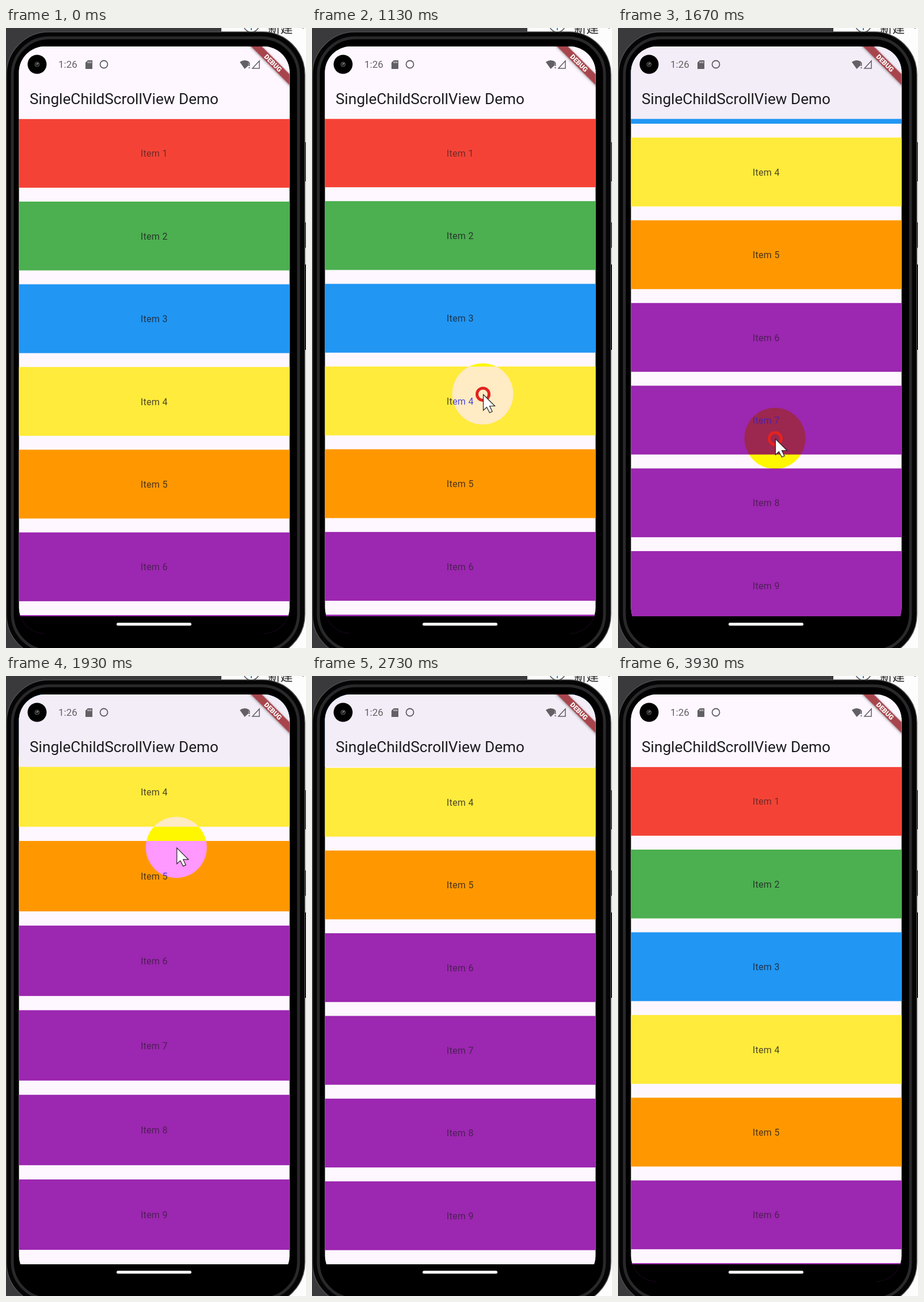
An HTML page that plays this animation: 521x1075 px, repeating every 3.99 s.

```html
<!DOCTYPE html>
<html lang="en">
<head>
<meta charset="utf-8">
<title>Scroll demo</title>
<style>
  html, body { margin: 0; height: 100%; overflow: hidden; background: #fff; }
  svg { display: block; width: 521px; height: 1075px; font-family: Roboto, sans-serif; }
  .item { font-size: 16px; letter-spacing: .3px; text-anchor: middle; fill: #1d1b20; }
  .halo { fill: #00f; mix-blend-mode: difference; }
  .ribbon { fill: #a8454c; filter: drop-shadow(0 1px 2px #0006); }
</style>
</head>
<body>
<svg viewBox="0 0 521 1075">
  <defs>
    <clipPath id="screen"><rect x="22.5" y="32" width="470" height="1018" rx="45"/></clipPath>
  </defs>

  <!-- desktop behind the phone -->
  <rect width="521" height="1075" fill="#fdfdfd"/>
  <path d="M0 0H374V20H260V1075H0Z" fill="#3a3a3c"/>
  <circle cx="426" cy="-7" r="14" fill="none" stroke="#555" stroke-width="1.5"/>
  <path d="M426 0V4" stroke="#2a8fd8" stroke-width="2"/>
  <text x="455" y="8" font-size="21.5" fill="#222" style="font-family:'Noto Sans CJK SC','Noto Sans CJK',sans-serif">新建</text>
  <path d="M513 -2l3 3 3-3" fill="none" stroke="#777"/>
  <path d="M519 198h2v68h-2zM519 337h2v44h-2z" fill="#444"/>
  <path d="M519 410h2v148h-2z"/>

  <!-- phone body -->
  <rect x=".7" y="6.700" width="518.300" height="1084" rx="74" fill="#050505" stroke="#4c4c4e" stroke-width="1.500"/>
  <rect x="11" y="17" width="497" height="1063" rx="64" stroke="#29292b" stroke-width="5"/>

  <g clip-path="url(#screen)">
    <rect x="22" y="32" width="471" height="988" fill="#fef7ff"/>
    <g id="list"></g>
    <rect id="bar" x="22" y="32" width="471" height="125.600"/>
    <rect x="22" y="1020" width="471" height="40"/>

    <circle cx="54" cy="63" r="16.5"/>
    <circle cx="54" cy="63" r="4" fill="#222" stroke="#555"/>
    <path d="M53 63l3-2" stroke="#aaa" stroke-width="1.5"/>
    <g fill="#626064">
      <text x="91" y="69" font-size="17">1:26</text>
      <path d="M142 56h8v15h-12v-11z"/>
      <path d="M142.5 58v3M145 58v3M147.5 58v3" stroke="#fef7ff"/>
      <circle cx="170" cy="63" r="6.500" fill="none" stroke="#626064" stroke-width="1.800"/>
      <path d="M406 59q8.500-6 17 0l-2 2v4l-6.500 6z"/>
      <path d="M421.500 60h2v6h-2zM421.500 68h2v2h-2z"/>
      <path d="M440 57v13h-12z" fill="none" stroke="#626064" stroke-width="1.500"/>
    </g>
    <text x="41" y="132" font-size="26.200" fill="#1d1b20">SingleChildScrollView Demo</text>
    <g transform="translate(463.800 60.800) rotate(45)">
      <rect class="ribbon" x="-60" y="-6.600" width="120" height="13.200"/>
      <text y="4.200" font-size="11.700" font-weight="900" fill="#fff" text-anchor="middle">DEBUG</text>
    </g>
  </g>
  <rect x="192" y="1031.300" width="130" height="5" rx="2.500" fill="#fff"/>

  <circle class="halo" id="halo" cx="-.5" cy="-.5" r="53"/>
  <g id="pointer">
    <circle id="ring" r="10.500" fill="none" stroke="#e3231f" stroke-width="5"/>
    <path d="M.5 .5V28L6.500 22.500L11.500 32L16 30L11.500 20.500H20.500Z" fill="#fff" stroke="#222" stroke-width="1.200"/>
  </g>
</svg>
<script>
const $ = id => document.getElementById(id);
const LOOP = 3990, STEP = 200 / 3, TOP = 157.6, BOTTOM = 1020, PITCH = 143.4;
const colors = ['#f44336', '#4caf50', '#2196f3', '#ffeb3b', '#ff9800'];
const purple = '#9c27b0';

$('list').innerHTML = Array.from({ length: 9 }, (_, i) => {
  const y = TOP + i * PITCH, fade = i && i < 5 ? .8 : .62;
  return `<rect x="22" y="${y}" width="471" height="119.3" fill="${colors[i] || purple}"/>
    <text class="item" x="257.3" y="${y + 65.7}" opacity="${fade}">Item ${i + 1}</text>`;
}).join('');

// Each drag: start, end, distance scrolled
const drags = [[1133, 1467, 397.6], [1666, 1900, 31], [2930, 3386, -428.6]];
// Turning points of the pointer: time, x, y
const turns = [
  [130, 330, -90], [530, 225, 552], [1133, 297, 635], [1420, 302, 235], [1667, 273, 712],
  [2040, 302, 195], [2267, 318, 400], [2800, 365, 1600], [2930, 340, 560], [3200, 352, 1140]
];

const ramp = (t, a, b) => Math.min(1, Math.max(0, (t - a) / (b - a)));
const smooth = p => p * p * (3 - 2 * p);
const slowing = p => 1 - (1 - p) ** 2;

function pointerAt(t) {
  let [, x, y] = turns[0];
  for (let i = 1; i < turns.length; i++) {
    const [start, x0, y0] = turns[i - 1], [end, x1, y1] = turns[i];
    const p = smooth(ramp(t, start, end));
    x += (x1 - x0) * p;
    y += (y1 - y0) * p;
  }
  return [x, y];
}

function draw(now) {
  const t = Math.min(59, Math.floor((now % LOOP + 5) / STEP)) * STEP;
  const [x, y] = pointerAt(t);
  const offset = drags.reduce((sum, [a, b, d]) => sum + d * slowing(ramp(t, a, b)), 0);
  const stretch = 1 + .03 * Math.sin(Math.PI * ramp(t, 1800, 2277));
  const tint = ramp(t, 1180, 1380) - ramp(t, 3380, 3580);

  $('list').setAttribute('transform',
    `translate(0 ${BOTTOM}) scale(1 ${stretch}) translate(0 ${-BOTTOM - offset})`);
  $('bar').setAttribute('fill', `rgb(${254 - 11 * tint},${247 - 10 * tint},${255 - 8 * tint})`);
  for (const id of ['halo', 'pointer']) $(id).setAttribute('transform', `translate(${x} ${y})`);
  $('ring').style.display = drags.some(([a, b]) => t >= a && t < b) ? '' : 'none';
  requestAnimationFrame(draw);
}
draw(performance.now());
</script>
</body>
</html>
```
